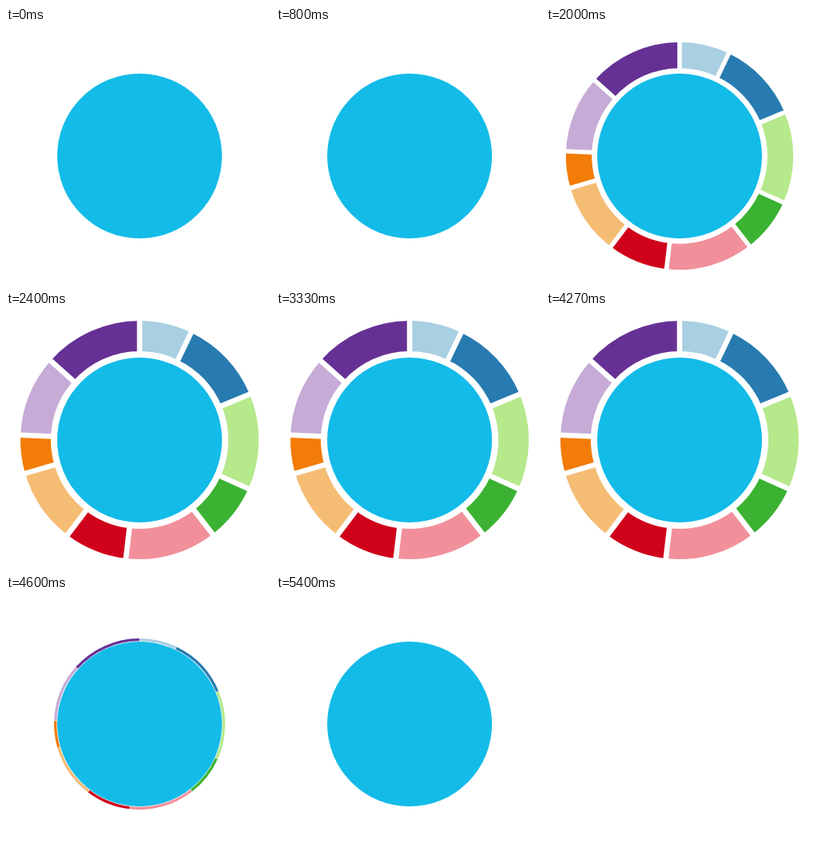
An HTML page with a canvas that plays this animation: 330 by 320 pixels, repeating every 5540 ms.

```html
<!DOCTYPE html>
<html lang="en">
<head>
<meta charset="utf-8">
<title>Unfolding ring</title>
<style>
  html, body { margin: 0; width: 100%; height: 100%; overflow: hidden; background: #fff; }
  canvas { display: block; }
</style>
</head>
<body>
<canvas id="stage" width="330" height="320"></canvas>
<script>
const ctx = document.getElementById('stage').getContext('2d');
const LOOP = 5540, STEP = 200 / 3;
const OPEN = 1752, CLOSE = 4300, DURATION = 655;
const RADIUS = 103;

// Clockwise from the top: end angle in degrees, colour
const segments = [
  [25.6, '#a9cfe2'], [67.4, '#287bb0'], [114.1, '#b6e88c'], [142.2, '#3cb232'],
  [186.6, '#f1909b'], [217.2, '#d0021b'], [253.7, '#f5bc74'], [272.4, '#f27c07'],
  [311.7, '#c6abd6'], [360, '#663194']
];

const rad = deg => (deg - 90) * Math.PI / 180;

function easeOut(t) {
  const x = Math.min(1, Math.max(0, t));
  return 1 - (1 - x) ** 4;
}

function drawRing(p) {
  const inner = RADIUS + 8 * p, outer = RADIUS + 46 * p;
  let start = 0;
  ctx.lineWidth = outer - inner;
  for (const [end, color] of segments) {
    ctx.strokeStyle = color;
    ctx.beginPath();
    ctx.arc(0, 0, (inner + outer) / 2, rad(start), rad(end));
    ctx.stroke();
    start = end;
  }
  // White gaps of even width
  ctx.strokeStyle = '#fff';
  ctx.lineWidth = 6.6 * p;
  ctx.beginPath();
  for (const [end] of segments) {
    const c = Math.cos(rad(end)), s = Math.sin(rad(end));
    ctx.moveTo(c * RADIUS, s * RADIUS);
    ctx.lineTo(c * (outer + 2), s * (outer + 2));
  }
  ctx.stroke();
}

function draw(time) {
  const t = Math.floor((time % LOOP) / STEP + 0.001) * STEP;
  const p = easeOut((t - OPEN) / DURATION) - easeOut((t - CLOSE) / DURATION);
  ctx.setTransform(1, 0, 0, 1, 0, 0);
  ctx.fillStyle = '#fff';
  ctx.fillRect(0, 0, 330, 320);
  ctx.translate(167, 160);
  if (p > 0.003) drawRing(p);
  ctx.fillStyle = '#13bbe8';
  ctx.beginPath();
  ctx.arc(0, 0, RADIUS, 0, 2 * Math.PI);
  ctx.fill();
}

const began = performance.now();
function tick() {
  draw(performance.now() - began);
  requestAnimationFrame(tick);
}
tick();
</script>
</body>
</html>
```
